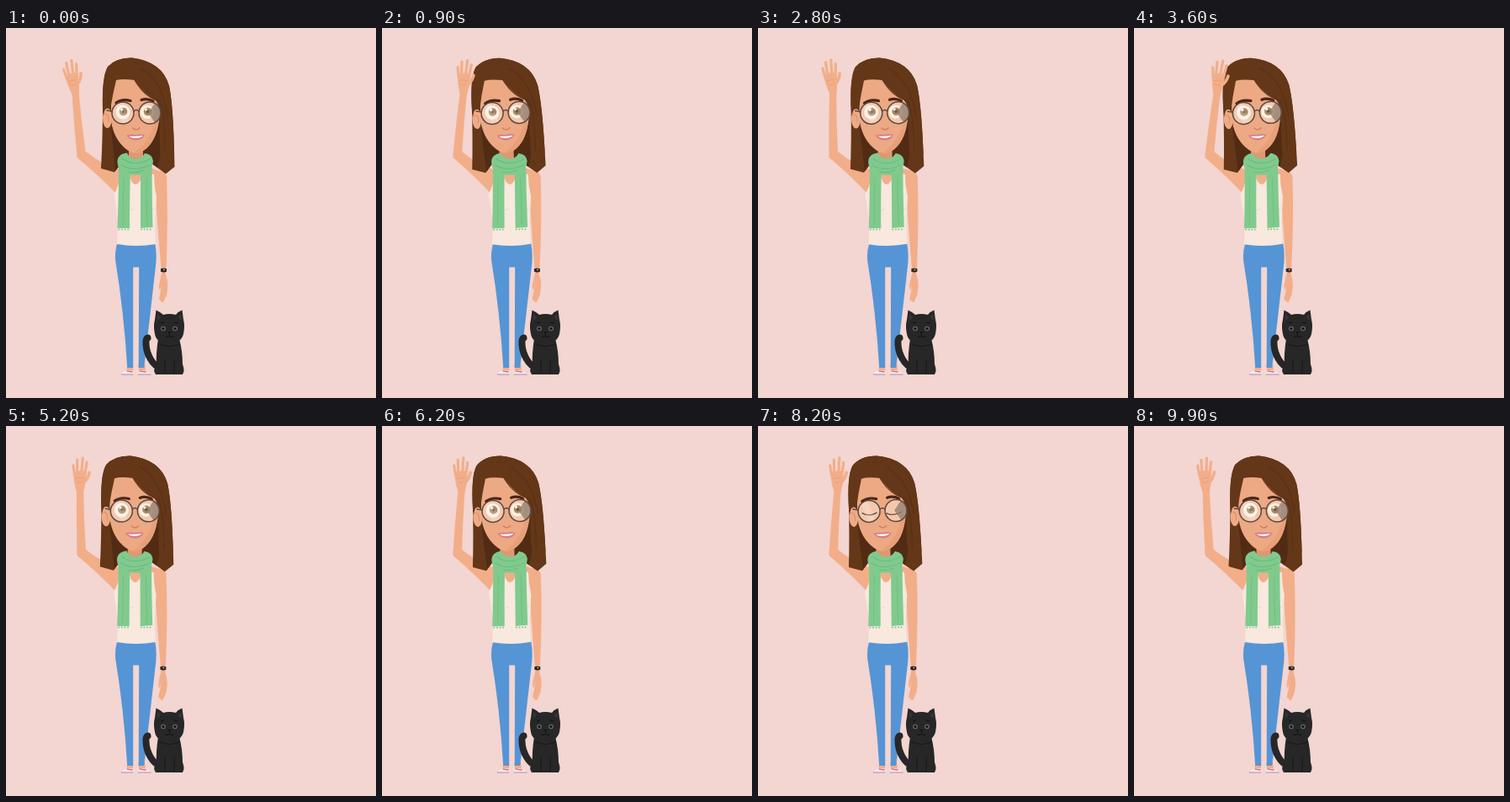
Recreate the animation shown at these times as an HTML page. Size 440x440 px, loop 10000 ms.

```html
<!DOCTYPE html>
<html lang="en">
<head>
<meta charset="utf-8">
<title>Waving woman with a cat</title>
<style>
  html, body { margin: 0; width: 100%; height: 100%; overflow: hidden; background: #f3d5d1; }
  svg { display: block; width: 100vw; height: 100vh; }
  .line { fill: none; stroke-linecap: round; stroke-linejoin: round; }
  .skin { fill: #f2ae89; }
  .fingers { stroke: #f2ae89; }
  .hair { fill: #633717; }
  .scarf { fill: #80ca8d; }
  .fold { stroke: #6db97d; }
  .cat { fill: #272727; }
</style>
</head>
<body>
<svg viewBox="0 0 440 440">
  <!-- legs and shoes -->
  <g transform="translate(-.8)">
    <path class="skin" d="M145 400h7v9h-8zM158 400h8l1 9h-8z"/>
    <path fill="#f8e9ec" d="M138 411q6-5 10-4l5 1v4h-15zM158 408l5-1q5 0 10 4v1h-15z"/>
    <path class="line" stroke="#d9737d" stroke-width="1.500" d="M145 408l6 1M160 408l7 1"/>
    <path class="line" stroke="#a58bb8" d="M138 412h14M158 412h15"/>
    <path fill="#5595d5" d="M133 256Q155 261 178 256Q181 270 178 290L165 404H158.500L159 284.500H152L152 404H145Q141 338 131 277Q130 266 133 256Z"/>
  </g>

  <g id="restArm">
    <path class="skin" d="M175 173Q187 167 191 176Q193 230 190.500 286L190 294Q193 301 192 310L188 308L186 300L183 312Q181 309 182.500 303L185 291Q180 235 178 200Z"/>
    <path class="line fingers" stroke-width="4" d="M189 300Q191 309 189 317L186 324M187 300L186 313L184 322"/>
    <path fill="#3f3431" d="M184 286h7v4h-7z"/>
    <circle cx="187.500" cy="288" r="2.600" fill="#272525"/>
    <circle cx="188" cy="287.500" r="1" fill="#b9a7a0"/>
  </g>

  <path id="upperArm" class="skin" d="M85 147L95 147Q113 162 137 169L134 200Q110 175 84.500 154Z"/>

  <g id="torso">
    <path class="skin" d="M130 174Q145 167 147 158H162Q165 166 184 170Q190 172 184 192L174 208H136L130 192Z"/>
    <path fill="#f8e8de" d="M136 174L147 173Q148 185 154 186Q160 185 162 173L176 174Q176 188 179 201L177 230L178 257Q155 261 132 257L133.500 232L128.500 197Q134 189 136 174Z"/>
    <path class="line" stroke="#eed9cf" d="M132 214q8 7 20 1M160 216q9 5 17-2"/>
  </g>

  <g id="backHair">
    <path class="hair" d="M113 167Q115 130 115 96Q114 58 121 46Q131 35 150 35.500Q186 40 194 69Q199 93 200.500 165L190 173.500L173 161H137L129 171.500Z"/>
    <path fill="#522b15" d="M125 118L183 112Q187 145 180 166L173 161H137L130 170Z"/>
    <path fill="#df9870" d="M146 138h17v27q-9 6-17 0z"/>
  </g>

  <g id="scarf">
    <path class="line" stroke="#7fc88e" stroke-width="2" stroke-dasharray="0 3.600" d="M134.500 239.500h13M161 239.500h13"/>
    <path class="scarf" d="M134 165L148 170Q147 200 147 238H132.500Q134 200 134 165ZM160 170L173.500 165Q173.500 200 174.500 237L160 238Z"/>
    <path class="line fold" stroke-width=".7" d="M140 178q-1 30-1 56M167 178q0 29 1 56"/>
    <path class="scarf" d="M132.500 160Q132 150 144 148.500Q146 155 154 155.500Q162 155 165 149Q174 150 175 158Q175 168 164 174Q152 176 141 173Q133 169 132.500 160Z"/>
    <path class="line fold" d="M138 155q14 11 33 1M137 163q15 9 34 0M146 171q10 2 18-2"/>
  </g>

  <g id="head">
    <ellipse cx="120.500" cy="107" rx="5.500" ry="12" fill="#efab86"/>
    <path class="line" stroke="#d88f6a" d="M118 102q5 1 4 10"/>
    <path fill="#eca983" d="M125 60Q146 54 166 62Q184 73 183 101Q181 132 166 144Q155 153 144 145Q128 133 125 110Z"/>
    <path fill="#e7a078" d="M181 88Q185 128 166 144Q160 149 153 148Q170 136 176 115Z"/>
    <path class="hair" d="M115 96Q114 58 121 46Q131 35 150 35.500Q186 40 194 69Q199 93 200 150L186 168Q182 150 183 111Q184 93 178 86Q164 79 153 62Q139 60 131 62Q127 78 124 97Q117 92 116 105Z"/>
    <path class="line" stroke="#593017" d="M153 62q12 21 30 25q7 20 6 60M160 48q27 15 32 58"/>
    <path class="line" stroke="#4c2615" stroke-width="3.200" d="M131 89Q138 84 148 86.500M161 85.500Q168 83 175 87"/>

    <g fill="#fff2e7" fill-opacity=".42">
      <circle cx="139" cy="101" r="12.500"/>
      <circle cx="171" cy="101" r="12.500"/>
    </g>
    <g id="open">
      <g fill="#fffaf3" fill-opacity=".8"><circle cx="139" cy="100" r="8.500"/><circle cx="168" cy="100" r="8"/></g>
      <g fill="#a8895f"><circle cx="139.500" cy="99.500" r="4.800"/><circle cx="168.500" cy="99.500" r="4.800"/></g>
      <g fill="#6f563f"><circle cx="139.500" cy="99.500" r="1.900"/><circle cx="168.500" cy="99.500" r="1.900"/></g>
      <g fill="#fff"><circle cx="137.500" cy="97" r="1.500"/><circle cx="166.500" cy="97" r="1.500"/></g>
    </g>
    <path id="closed" class="line" stroke="#6b4934" stroke-width="1.300" d="M131 103q8 5 17 0M160 104q8 4 17-1"/>
    <path fill="#fff" fill-opacity=".2" d="M130 92L137 88L146 111L138 113Z"/>
    <path fill="#94806f" fill-opacity=".8" d="M177 89.500Q184 94 183.500 102Q182 111 177 112.500L169 101Z"/>
    <g class="line" stroke="#5a4a46" stroke-width="1.500">
      <circle cx="139" cy="101" r="13"/>
      <circle cx="171" cy="101" r="13"/>
      <path d="M152 99q3-3 6 0M126 99l-6-1"/>
    </g>
    <path class="line" stroke="#cf835d" stroke-width="1.500" d="M151 119q4 4 8 0"/>
    <path fill="#d97b88" d="M143.500 127.500Q150 126 154 127Q159 126 165 127Q162 133.500 154.500 133.500Q147 133 143.500 127.500Z"/>
    <path fill="#fff" d="M146 128.500Q155 129 163 128Q160 131 154 131Q149 131 146 128.500Z"/>
  </g>

  <!-- waving hand passes in front of the hair -->
  <g id="forearm">
    <path class="skin" d="M-4.500 1Q-5-40-4-77H4Q4-40 6-1Q3 6-2 5Z"/>
    <g id="hand">
      <path class="skin" d="M-4 3Q-8-10-8.500-20Q-2-25 7-22Q7-9 4 3Z"/>
      <path class="line fingers" stroke-width="3.200" d="M-7-17L-9-29M-4-19L-4.500-36M1-19L2-38M5-18L7-33"/>
      <path class="line fingers" stroke-width="3.600" d="M4-9Q9-13 10.500-21"/>
      <path class="line" stroke="#df966f" stroke-width=".6" d="M-4-10q4 4 7-1M-6-13q4-3 9-1"/>
    </g>
  </g>

  <!-- cat -->
  <path class="line" stroke="#272727" stroke-width="8" d="M184 404C174 402 167 387 166.500 376Q166 369 168.500 368.500"/>
  <path class="cat" d="M181 369H206Q210 385 210 400Q213 407 210 412H178Q174 407 179 400Q178 390 181 369Z"/>
  <path class="cat" d="M178.500 335.500Q184 338 187 341Q194 339 202 341Q205 337 209.500 335.500L211 347Q213 354 211 364Q208 375 194 375Q179 375 177 364Q175 354 177 347Z"/>
  <path fill="#393636" d="M180 340l4 4l-4 4zM208.500 340l-4 4l4 4z"/>
  <path class="line" stroke="#171717" d="M189 395v15M200 395v15M183 376q11 5 23 0"/>
  <g fill="#68717b"><circle cx="187" cy="357.500" r="2.800"/><circle cx="201" cy="357.500" r="2.800"/></g>
  <g fill="#171717"><circle cx="187" cy="357.500" r="1.700"/><circle cx="201" cy="357.500" r="1.700"/><path d="M192 361h5l-2.500 3z"/></g>
  <path class="line" stroke="#111" d="M194.500 364v2q-2 3-5 1M194.500 366q2 3 5 1M184 351l4-1M200 350l4 1"/>
</svg>
<script>
  const STEP = 100, LOOP = 10000, WAVE = LOOP / 15, BLINK = 5000;
  const part = id => document.getElementById(id);
  const pose = (id, value) => part(id).setAttribute('transform', value);

  function draw(now) {
    const t = Math.floor(now % LOOP / STEP) * STEP;
    const swing = shift => Math.cos(2 * Math.PI * (t / WAVE + shift));
    const lean = (swing(.05) - .95) / 1.9;
    const forearm = 1.8 - 6.8 * swing(.01);
    const hand = 1 - 12 * swing(-.06);
    const headPose = `translate(${6.5 * lean}) rotate(${2 * lean} 152 160)`;
    const bodyPose = `translate(${1.2 * lean}) rotate(${.8 * lean} 155 258)`;

    pose('backHair', headPose);
    pose('head', headPose);
    pose('torso', bodyPose);
    pose('scarf', bodyPose);
    pose('restArm', `translate(${2.5 * lean}) rotate(${-.4 * lean} 185 175)`);
    pose('upperArm', `rotate(${-lean} 88 151)`);
    pose('forearm', `translate(89 151) rotate(${forearm})`);
    pose('hand', `translate(0 -75) rotate(${hand - forearm})`);

    const blink = Math.abs(t % BLINK - 3200) < 100;
    part('open').style.display = blink ? 'none' : '';
    part('closed').style.display = blink ? '' : 'none';
  }

  const start = performance.now();
  function tick() {
    draw(performance.now() - start);
    requestAnimationFrame(tick);
  }
  tick();
</script>
</body>
</html>
```
